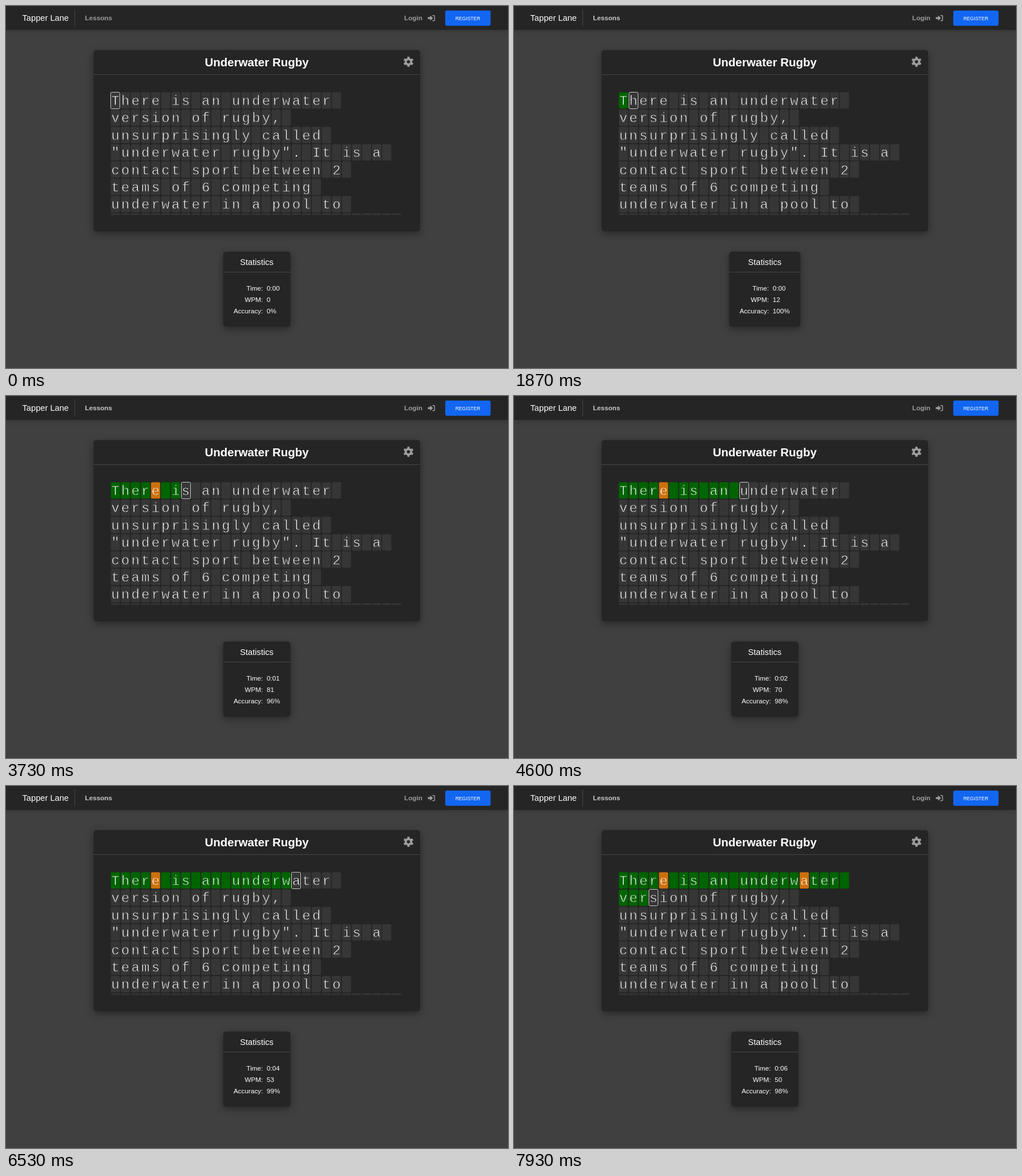
Animation, 880 px wide and 636 px high, one loop 8 s. Source, as an HTML page:

```html
<!DOCTYPE html>
<html lang="en">
<head>
<meta charset="utf-8">
<title>Typing lesson</title>
<style>
  html, body { margin: 0; width: 100%; height: 100%; overflow: hidden; background: #404040; }
  svg { display: block; font: 11.73px "Liberation Sans", Arial, sans-serif; fill: #fff; }
  .bar, .panel { fill: #252525; }
  .bar { filter: drop-shadow(0 2px 5px rgba(0, 0, 0, .2)); }
  .panel { filter: drop-shadow(0 4px 7px rgba(0, 0, 0, .38)); }
  .rule { stroke: #464646; }
  .muted { fill: #9d9d9d; }
  .bold { font-weight: bold; }
  .big { font-size: 14.67px; }
  .mid { text-anchor: middle; }
  .end { text-anchor: end; }
  .line { fill: none; stroke: #9d9d9d; }
  #text { font: 24px "Liberation Mono", "Courier New", monospace; text-anchor: middle; }
  #text text { stroke-width: .8px; }
</style>
</head>
<body>
<svg width="880" height="636" viewBox="0 0 880 636">
  <rect class="bar" width="880" height="42"/>
  <text class="big" x="28.5" y="26">Tapper Lane</text>
  <path class="rule" d="M120.5 6v30"/>
  <text id="lessons" class="bold" x="138.5" y="25">Lessons</text>
  <text class="bold muted" x="698" y="25">Login</text>
  <path class="muted" d="M739.5 19.6h4v-3.1l5 4.8-5 4.8v-3.1h-4z"/>
  <path class="line" stroke-width="1.5" d="M747.5 16.8h2.6a1.2 1.2 0 0 1 1.2 1.2v6.6a1.2 1.2 0 0 1-1.2 1.2h-2.6"/>
  <rect x="770" y="8" width="79.5" height="26.7" rx="3" fill="#1266f1"/>
  <text class="mid" x="809.6" y="24.6" font-size="8.6">REGISTER</text>

  <rect class="panel" x="153.5" y="77.5" width="572.5" height="318.5" rx="5"/>
  <path class="rule" d="M153.5 120.5h572.5"/>
  <text class="bold mid" x="439.6" y="106" font-size="20.53">Underwater Rugby</text>
  <g class="line" transform="translate(705.5 98)">
    <circle r="4.8" stroke-width="4"/>
    <circle r="7.5" stroke-width="2.8" pathLength="12" stroke-dasharray="1 1" stroke-dashoffset="-.5"/>
  </g>
  <clipPath id="view"><rect x="170" y="145" width="540" height="222"/></clipPath>
  <g id="text" clip-path="url(#view)"></g>
  <rect id="cursor" width="16" height="29" rx="2" fill="none" stroke="#ccc"/>

  <rect id="statsPanel" class="panel" y="431.5" height="132" rx="5"/>
  <path id="statsRule" class="rule"/>
  <text class="big mid" x="439.6" y="455">Statistics</text>
  <g id="stats">
    <text class="end" x="69.7" y="499.7">Time:</text><text class="value" x="76.2" y="499.7"/>
    <text class="end" x="69.7" y="520.2">WPM:</text><text class="value" x="76.2" y="520.2"/>
    <text class="end" x="69.7" y="540.4">Accuracy:</text><text class="value" x="76.2" y="540.4"/>
  </g>
</svg>
<script>
const LOOP = 8000, START = 1870;
const LEFT = 183.7, TOP = 151.5, PITCH_X = 17.62, PITCH_Y = 30.4;
const lines = [
  'There is an underwater ',
  'version of rugby, ',
  'unsurprisingly called ',
  '"underwater rugby". It is a ',
  'contact sport between 2 ',
  'teams of 6 competing ',
  'underwater in a pool to ',
  ' '.repeat(29)
];
const keyTimes = [1870, 2130, 2270, 2470, 2870, 3200, 3400, 3530, 3730, 3870,
  4070, 4200, 4400, 4600, 4800, 5000, 5130, 5400, 5600, 5930,
  6200, 6530, 6670, 6930, 7000, 7270, 7400, 7600, 7800, 7930];
const wrongKeys = [2870, 6200], backspaces = [3200, 6530];
const colors = { 0: '#dc0000', 0.75: '#cc700c', 1: '#006400', idle: '#363636' };

const $ = id => document.getElementById(id);
const set = (el, attrs) => {
  for (const name in attrs) el.setAttribute(name, attrs[name]);
  return el;
};
const add = (parent, tag, attrs) =>
  parent.appendChild(set(document.createElementNS('http://www.w3.org/2000/svg', tag), attrs));
const values = document.querySelectorAll('.value');

const cells = lines.flatMap((line, row) => [...line].map((char, col) => {
  const x = LEFT + col * PITCH_X, y = TOP + row * PITCH_Y;
  const group = add($('text'), 'g', {});
  const box = add(group, 'rect', { x, y, width: 16, height: 28.7, rx: 2, 'stroke-width': 0 });
  add(group, 'text', { x: x + 8, y: y + 22.4 }).textContent = char;
  return { group, box, x, y };
}));

// A mark is the credit for each typed character: 1, 0, or 0.75 once corrected.
function marksAt(t) {
  const marks = [], failed = new Set();
  for (const time of keyTimes.filter(k => k <= t)) {
    if (backspaces.includes(time)) marks.pop();
    else if (wrongKeys.includes(time)) {
      failed.add(marks.length);
      marks.push(0);
    } else marks.push(failed.has(marks.length) ? 0.75 : 1);
  }
  return marks;
}

function draw(t) {
  const hover = t < 1070 ? 0 : Math.min(1, 0.5 + (t - 1070) / 120);
  const grey = Math.round(157 + 44 * hover);
  set($('lessons'), { fill: `rgb(${grey},${grey},${grey})` });

  const marks = marksAt(t);
  cells.forEach(({ group, box }, i) => {
    const color = colors[marks[i] ?? 'idle'];
    set(box, { fill: color });
    set(group, { stroke: color }); // an outline in the cell colour thins the letter
  });
  const { x, y } = cells[marks.length];
  set($('cursor'), { x: Math.floor(x) + 0.5, y: Math.floor(y) + 0.5 });

  const score = marks.reduce((sum, mark) => sum + mark, 0);
  const seconds = Math.max(0, Math.floor((t - START) / 1000));
  const accuracy = marks.length ? Math.round(score / marks.length * 100) : 0;
  const wpm = Math.floor(score / 5 / (Math.max(1, seconds) / 60));
  [`0:0${seconds}`, wpm, `${accuracy}%`].forEach((text, i) => values[i].textContent = text);

  const width = accuracy === 100 ? 125 : 118, left = 439.7 - width / 2;
  set($('statsPanel'), { x: left, width });
  set($('statsRule'), { d: `M${left} 467.5h${width}` });
  set($('stats'), { transform: `translate(${left} 0)` });
}

const origin = performance.now();
function frame() {
  draw((performance.now() - origin) % LOOP);
  requestAnimationFrame(frame);
}
frame();
</script>
</body>
</html>
```
